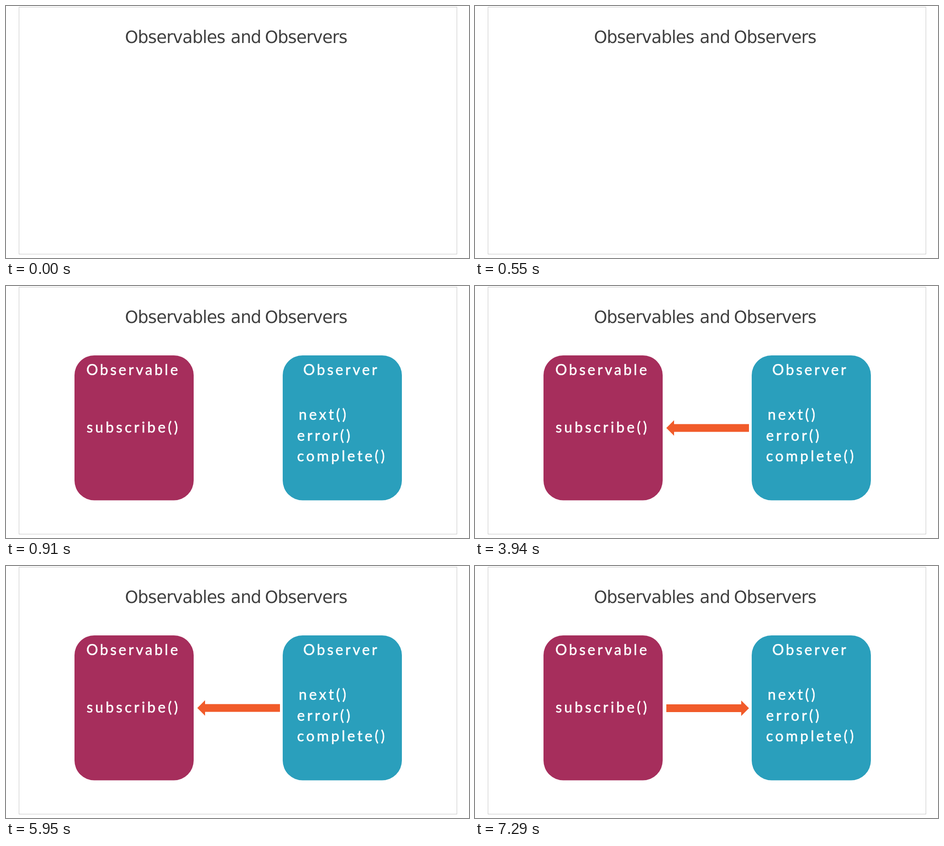
An HTML page that plays this animation: 1014x552 px, repeating every 8000 ms.

```html
<!DOCTYPE html>
<html lang="en">
<head>
<meta charset="utf-8">
<title>Observables and Observers</title>
<style>
  html, body { margin: 0; height: 100%; overflow: hidden; background: #fff; }
  svg { display: block; }
  .title { font: 37px "DejaVu Sans", sans-serif; letter-spacing: -1px; fill: #404040; }
  .label { font: 32px Lato, sans-serif; letter-spacing: 5px; fill: #fff; }
  .label text { stroke: #fff; stroke-width: .6px; }
  .heading { letter-spacing: 4.5px; }
  .arrow { fill: #f15b2a; }
</style>
</head>
<body>
<svg width="1014" height="552" viewBox="0 0 1014 552">
  <rect x="28.5" y="2.5" width="959" height="541" fill="none" stroke="#c8c8c8"/>
  <g class="title">
    <text x="260.5" y="81">Observables</text>
    <text x="492" y="81">and</text>
    <text x="567" y="81">Observers</text>
  </g>
  <g id="boxes" class="label" visibility="hidden">
    <rect x="150" y="152" width="261" height="317.5" rx="43.5" fill="#a62e5c"/>
    <text class="heading" x="176" y="194.5">Observable</text>
    <text x="176.5" y="320.5">subscribe()</text>
    <rect x="606" y="152" width="261" height="317.5" rx="43.5" fill="#2a9fbc"/>
    <text class="heading" x="651" y="194.5">Observer</text>
    <text x="641" y="292.5">next()</text>
    <text x="637.5" y="338.5">error()</text>
    <text x="637.5" y="383.5">complete()</text>
  </g>
  <path id="toObservable" class="arrow" visibility="hidden"
        d="M419 311L436 294V302.5H600V319.5H436V328Z"/>
  <path id="toObserver" class="arrow" visibility="hidden"
        d="M600 311.5L583 294.5V303H419V320H583V328.5Z"/>
</svg>
<script>
  const LOOP = 8000;
  const spans = { boxes: [910, LOOP], toObservable: [3940, 7290], toObserver: [7290, LOOP] };
  const start = performance.now();

  function draw() {
    const t = (performance.now() - start) % LOOP;
    for (const [id, [from, to]] of Object.entries(spans)) {
      const shown = t >= from && t < to;
      document.getElementById(id).setAttribute("visibility", shown ? "visible" : "hidden");
    }
    requestAnimationFrame(draw);
  }
  draw();
</script>
</body>
</html>
```
